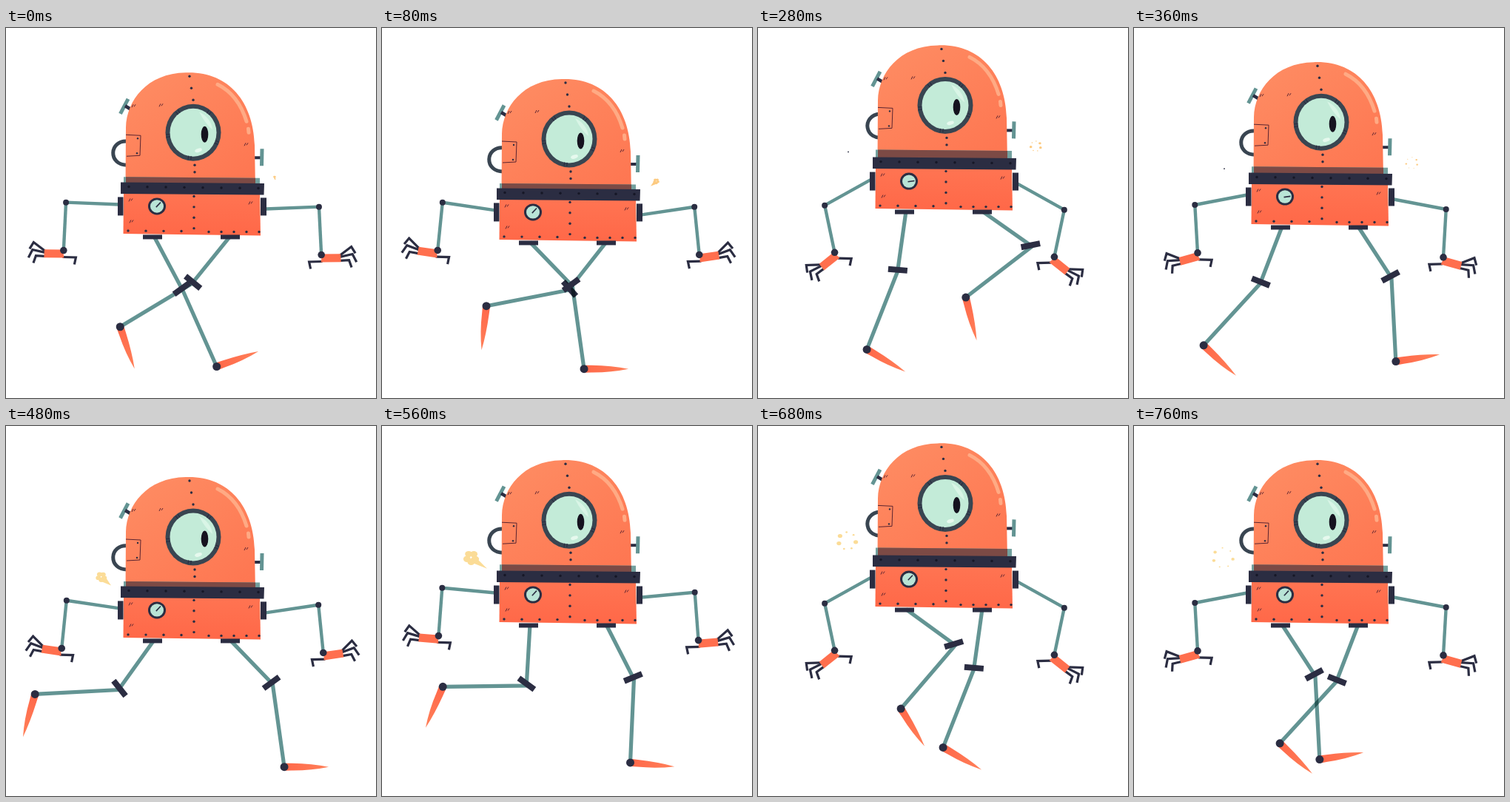
Write an HTML page with a canvas that moves like this. It is 500 by 500 pixels and loops after 800 ms.

```html
<!DOCTYPE html>
<html lang="en">
<head>
<meta charset="utf-8">
<title>Walking robot</title>
<style>
html, body { margin: 0; width: 100%; height: 100%; overflow: hidden; background: #fff; }
canvas { display: block; width: 500px; height: 500px; }
</style>
</head>
<body>
<canvas id="stage" width="500" height="500"></canvas>
<script>
const ctx = document.getElementById('stage').getContext('2d');
const LOOP = 800, STRIDE = LOOP / 2, STEP = 40;
const THIGH = 82.5, SHIN = 113, UPPER = 72, FORE = 65;
const INK = '#2b2d42', SLATE = '#394551', TEAL = '#639493', ORANGE = '#ff6f4e';
const MINT = '#c3ebd8', SCRATCH = '#5b2430';
const { sin, cos, PI, max, min } = Math;
const RAD = PI / 180;

// Key poses of one leg: time, thigh, shin, foot (degrees)
const GAIT = [
  [0, 28, 24, -20], [80, 44, 8, 0], [160, 27, -2.5, 5],
  [280, -8, -21.5, 30], [360, -21, -42.5, 43], [400, -39, -59, 71],
  [525, -24, -94, 115], [645, 53, -57, 82], [760, 33, 3, -9]
];

// Smooth looping curve through the key poses
function gait(time) {
  const n = GAIT.length, t = time % LOOP;
  let i = n - 1;
  while (GAIT[i][0] > t) i--;
  const row = k => GAIT[(k + n) % n];
  const at = k => row(k)[0] + Math.floor(k / n) * LOOP;
  const d = at(i + 1) - at(i), s = (t - at(i)) / d;
  return [1, 2, 3].map(j => {
    const v = row(i)[j], w = row(i + 1)[j];
    const m = d * (w - row(i - 1)[j]) / (at(i + 1) - at(i - 1));
    const k = d * (row(i + 2)[j] - v) / (at(i + 2) - at(i));
    return v + m * s + (3 * (w - v) - 2 * m - k) * s * s + (2 * (v - w) + m + k) * s ** 3;
  });
}

// Raised cosine, one bump per stride, 1 at its peak
const wave = (t, peak) => (1 + cos(2 * PI * (t - peak) / STRIDE)) / 2;

// The right leg swings forward a little late
function late(t) {
  const p = t % LOOP;
  return p > 400 && p < 760 ? p - 38 * sin(PI * (p - 400) / 360) : p;
}

function group(x, y, deg, draw) {
  ctx.save();
  ctx.translate(x, y);
  ctx.rotate(deg * RAD);
  draw();
  ctx.restore();
}

function trace(pts) {
  ctx.beginPath();
  for (let i = 0; i < pts.length; i += 2) ctx.lineTo(pts[i], pts[i + 1]);
}

function poly(color, ...pts) {
  ctx.fillStyle = color;
  trace(pts);
  ctx.fill();
}

function line(color, width, ...pts) {
  ctx.strokeStyle = color;
  ctx.lineWidth = width;
  trace(pts);
  ctx.stroke();
}

function path(d, fill, stroke, width) {
  const p = new Path2D(d);
  if (fill) {
    ctx.fillStyle = fill;
    ctx.fill(p);
  }
  if (stroke) {
    ctx.strokeStyle = stroke;
    ctx.lineWidth = width;
    ctx.stroke(p);
  }
}

function oval(color, x, y, rx, ry = rx, tilt = 0) {
  ctx.fillStyle = color;
  ctx.beginPath();
  ctx.ellipse(x, y, rx, ry, tilt, 0, 2 * PI);
  ctx.fill();
}

function box(color, x, y, w, h) {
  ctx.fillStyle = color;
  ctx.fillRect(x, y, w, h);
}

function blend(x0, y0, x1, y1, from, to) {
  const g = ctx.createLinearGradient(x0, y0, x1, y1);
  g.addColorStop(0, from);
  g.addColorStop(1, to);
  return g;
}

function rivets(n, x, y, dx, dy, color = INK) {
  for (let i = 0; i < n; i++) oval(color, x + i * dx, y + i * dy, 1.7);
}

function scratch(x, y) {
  line(SCRATCH, 1, x, y + 4, x + 2, y);
  line(SCRATCH, 1, x + 3, y + 3, x + 5, y);
}

function leg(hx, hy, [thigh, shin, foot]) {
  const sx = sin(thigh * RAD), sy = cos(thigh * RAD);
  const kx = hx + THIGH * sx, ky = hy + THIGH * sy;
  const ax = kx + SHIN * sin(shin * RAD), ay = ky + SHIN * cos(shin * RAD);
  ctx.globalCompositeOperation = 'multiply';
  line(TEAL, 5.2, hx, hy, kx, ky, ax, ay);
  ctx.globalCompositeOperation = 'source-over';
  group(kx - 2.5 * sx, ky - 2.5 * sy, -(thigh + shin) / 2 - 10, () => box(INK, -13, -4, 26, 8));
  group(ax, ay, foot, () =>
    path('M2-5L10-4.8Q38-4 60 0Q36 5 10 4.8L2 5Z', blend(5, 0, 60, 0, '#ff6a4b', '#ff8059')));
  oval(INK, ax, ay, 5.5);
}

function arm(sy, bend) {
  const fore = 1.8 + 0.47 * bend, turn = bend * 1.25;
  const ex = 153 - UPPER * cos(bend * RAD), ey = sy - UPPER * sin(bend * RAD);
  const wx = ex - FORE * sin(fore * RAD), wy = ey + FORE * cos(fore * RAD);
  line(TEAL, 4.4, 153, sy, ex, ey);
  line(TEAL, 4.4, ex, ey, wx, wy);
  oval(INK, ex, ey, 4);
  group(wx, wy, turn, () => {
    line(INK, 3.2, -25, 2, -41, -9, -46, 0);
    line(INK, 3.2, -25, 4, -42, 1, -47, 12);
    line(INK, 3.2, -25, 9, -37, 9, -40, 19);
    // the thumb stays level
    group(-1, 9, -turn, () => line(INK, 3.2, 0, 0, 18, 0.5, 16, 10));
    poly(ORANGE, -26, 0, -1, -1, 1, 10, -26, 11);
  });
  oval(INK, wx, wy, 4.8);
}

function eye() {
  oval(SLATE, 0, 0, 37.5, 38.5);
  oval(MINT, 0, 0, 31.5, 32.5);
  path('M8-28Q24-20 26-4Q16-12 8-28Z', '#d9f5e6');
  oval('#e6f9ee', 7, 24, 5, 2.5, -0.3);
  for (let a = -130; a < 180; a += 75) {
    for (const deg of [a, a + 6]) {
      group(0, 0, deg, () => line(INK, 1.2, 32, 0, 37, 0));
    }
  }
  oval('#15131f', 15.5, 2.5, 4.8, 11);
}

function dome(lift) {
  // knobs and the dangling handle
  line(TEAL, 5, 154.5, 117.5, 165, 97.5);
  line(INK, 4.5, 161, 107, 171, 113);
  line(INK, 4, 335, 177, 345, 177);
  line(TEAL, 5, 346, 165, 345.5, 188);
  group(163, 155, min(0, lift + 16) * 0.5, () =>
    path('M2 0C-24-3-26 33 2 32', null, SLATE, 5));

  path('M161.5 220L162 136C163 100 190 63 243 62C300 60 334 100 336 160L337 220Z',
    blend(190, 80, 290, 225, '#fe8a61', '#fe7752'));
  ctx.lineCap = 'round';
  path('M286 78Q314 92 325 128M327.5 138L328 143', null, '#ffaa84', 5);
  ctx.lineCap = 'butt';

  path('M162 146L182 147L181 174L163 175', null, SCRATCH, 1);
  oval(INK, 178, 151, 1.2);
  oval(INK, 177, 171, 1.2);
  scratch(170, 105);
  scratch(207, 104);
  scratch(322, 157);
  rivets(3, 248, 67, 2.5, 16);
  rivets(3, 255, 187, 0, 9.5);
  group(253, 143, 0, eye);

  // collar
  poly('#73a09e', 159, 203, 343, 204.5, 343, 222, 159, 222);
  poly('#7c4a45', 162, 203, 337, 204.5, 337, 222, 162, 222);
}

function hull(needle) {
  poly(blend(0, 225, 0, 282, '#ff7452', '#ff6848'), 159, 222, 343, 222, 344, 282, 158.5, 279.5);
  poly(INK, 155, 210, 349, 211.5, 348.5, 227, 155, 225.5);
  rivets(8, 166, 216, 25, 0.3, '#161726');
  rivets(4, 254, 229, 0, 14.4);
  rivets(4, 165, 275.5, 24, 0.2);
  rivets(5, 274, 277, 17, 0);
  scratch(166, 232);
  scratch(167, 261);
  scratch(328, 236);
  oval(INK, 204, 242.5, 12, 11.5);
  oval('#b9e4d6', 204, 242.5, 9, 8.7);
  group(203.5, 243, needle, () => line(INK, 1.6, -1, 0, 8, 0));
  box(INK, 151, 230, 7.5, 25);
  box(INK, 344, 231, 8, 24);
  box(INK, 185, 281, 26, 6);
  box(INK, 290, 281, 26, 6);
}

// Steam: a jet swells to a cloud, then breaks into specks
function puff(age, x, y, size, color) {
  ctx.save();
  ctx.translate(x, y);
  ctx.scale(size, Math.abs(size));
  const out = min(1, age / 130), grow = min(1, 0.3 + age / 200);
  const fade = max(0, (age - 230) / 170), whole = age < 230;
  const cx = 13 * out, cy = -5 * out, n = whole ? 5 : 7;
  if (whole) poly(color, 0, 4, cx - 2, cy - 2, cx + 2, cy + 3);
  for (let i = 0; i < n; i++) {
    const a = 2 * PI * i / n + 0.3;
    const r = whole ? 3.6 * grow : 6.5 + 2 * fade;
    const d = whole ? 3 * grow : (i % 3 ? 1 : 2.2) * (1 - fade * 0.5);
    oval(color, cx + r * cos(a), cy + r * sin(a), d, d * 0.85);
  }
  ctx.restore();
}

function draw(t) {
  box('#fff', 0, 0, 500, 500);
  const bob = 44 * wave(t, 60) - 36.5;
  const lift = bob * 1.09;
  const bend = 8.5 - 38 * wave(t, 288) ** 2;
  const needle = -47 + 39 * max(0, 1 - ((t - 320) / 160) ** 4);

  leg(303, 283 + bob, gait(late(t + STRIDE)));
  leg(200, 283 + bob, gait(t));
  arm(240 + bob, bend);
  ctx.save();
  ctx.translate(504, 6);
  ctx.scale(-1, 1);
  arm(240 + bob, bend);
  ctx.restore();

  group(0, lift, 0, () => dome(lift));
  group(0, bob, 0, () => hull(needle));
  group(0, lift, 0, () => {
    if (t < STRIDE) puff(t, 363, 203, 0.95, '#fcca80');
    else puff(t - STRIDE, 142, 202, -1.65, '#fbdc97');
    if (t >= 280 && t < STRIDE) oval(INK, 122, 206, 0.9);
  });
}

const start = performance.now();
function tick() {
  const t = (performance.now() - start) % LOOP;
  draw(Math.floor(t / STEP) * STEP);
  requestAnimationFrame(tick);
}
tick();
</script>
</body>
</html>
```
